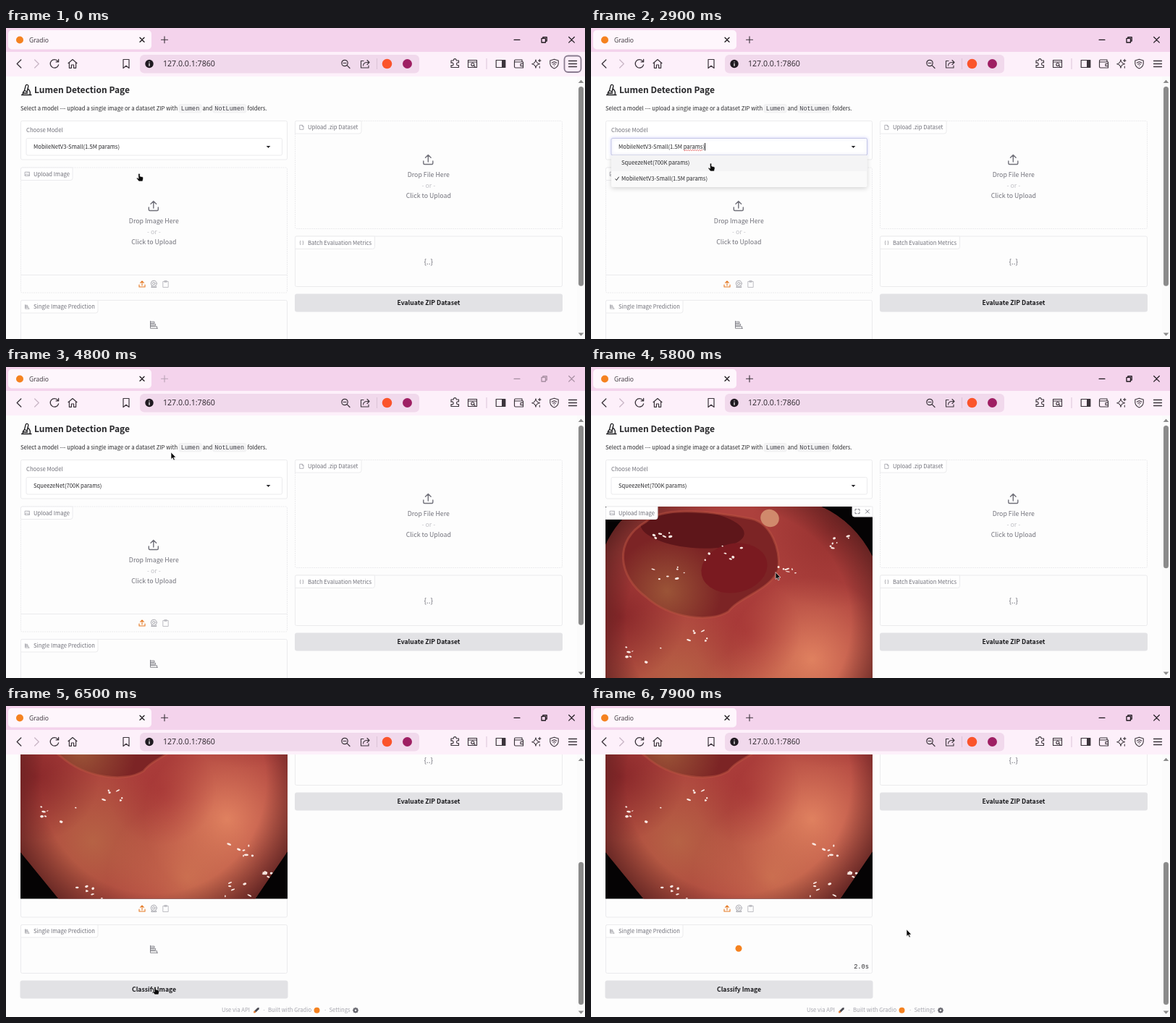
Animation of 800x430 px, one loop 8000 ms. Source, as an HTML page with a canvas:

```html
<!DOCTYPE html>
<html lang="en">
<head>
<meta charset="utf-8">
<title>Lumen Detection Page</title>
<style>
html, body { margin: 0; width: 100%; height: 100%; overflow: hidden; background: #fdfdfd; }
canvas { display: block; }
</style>
</head>
<body>
<canvas id="stage" width="800" height="430"></canvas>
<script>
const c = document.getElementById('stage').getContext('2d');
const SANS = '"Noto Sans CJK JP", "Noto Sans CJK SC", "Noto Sans", sans-serif';
const UI = '"Open Sans", "Noto Sans", sans-serif';
const MONO = '"Liberation Mono", "DejaVu Sans Mono", monospace';
const LOOP = 8000, STEP = 100;
const OPEN = 1500, PICK = 3100, DIALOG = 4300, LOADED = 5600, RUN = 6900;
const INK = '#27272a', GREY = '#71717a', LINE = '#ebebed', DARK = '#3b343b';
const ORANGE = '#f58220', TOP = 67;

// Pointer tip: time, x, y
const route = [
  [0, 184, 201], [300, 184, 201], [1100, 205, 163], [1700, 205, 163],
  [2500, 170, 190], [2900, 165.5, 187], [3100, 165.5, 187], [3900, 204, 268],
  [4300, 204, 268], [4800, 228, 118], [5200, 185, 170], [5500, 215, 215],
  [5800, 255, 284], [6000, 251, 280], [6500, 206, 388], [6900, 206, 388],
  [7100, 219.5, 320], [7900, 436, 309], [8000, 436, 309]
];

function pointerAt(t) {
  const i = route.findIndex(p => p[0] > t);
  const a = route[i - 1], b = route[i];
  let k = (t - a[0]) / (b[0] - a[0]);
  k = k * k * (3 - 2 * k);
  return [a[1] + (b[1] - a[1]) * k, a[2] + (b[2] - a[2]) * k];
}

// y is the middle of the capitals; returns the width
function text(s, x, y, size, color = INK, { align = 'left', weight = 400, family = SANS } = {}) {
  c.font = `${weight} ${size}px ${family}`;
  c.textAlign = align;
  c.fillStyle = color;
  c.fillText(s, x, y + size * 0.36);
  return c.measureText(s).width;
}

function box(x, y, w, h, r, fill, stroke, lw = 1, dash = []) {
  c.beginPath();
  c.roundRect(x, y, w, h, r);
  if (fill) { c.fillStyle = fill; c.fill(); }
  if (stroke) {
    c.strokeStyle = stroke;
    c.lineWidth = lw;
    c.setLineDash(dash);
    c.stroke();
    c.setLineDash([]);
  }
}

function icon(d, x, y, color, lw = 1.1, fill) {
  const p = new Path2D(d);
  c.save();
  c.translate(x, y);
  c.lineJoin = c.lineCap = 'round';
  if (fill) { c.fillStyle = fill; c.fill(p); }
  if (lw) { c.strokeStyle = color; c.lineWidth = lw; c.stroke(p); }
  c.restore();
}

function oval(x, y, rx, ry, fill, turn = 0) {
  c.beginPath();
  c.ellipse(x, y, rx, ry, turn, 0, 7);
  c.fillStyle = fill;
  c.fill();
}

const dot = (x, y, r, fill) => oval(x, y, r, r, fill);

const ICONS = {
  upload: 'M-6.5 2V5Q-6.5 6.5 -5 6.5H5Q6.5 6.5 6.5 5V2M0 3V-6.5M-3.8 -2.8L0 -6.5L3.8 -2.8',
  smallUpload: 'M-4 1V4H4V1M0 2V-4M-2.4 -1.7L0 -4L2.4 -1.7',
  webcam: 'M4 -.8A4 4 0 1 1 -4 -.8A4 4 0 1 1 4 -.8M1.7 -.8A1.7 1.7 0 1 1 -1.7 -.8A1.7 1.7 0 1 1 1.7 -.8M-2.5 2.5L-3.5 4.5H3.5L2.5 2.5',
  clipboard: 'M-3.5 -3.5H3.5V4.5H-3.5ZM-1.5 -4.5H1.5V-2.7H-1.5Z',
  image: 'M-3 -2.6H3V2.6H-3ZM-3 1.5L-1 0L.5 1.5L1.5 .7L3 2M1.2 -1.2h.2',
  file: 'M-2.3 -3H.8L2.5 -1.2V3H-2.3ZM.8 -3V-1.2H2.5',
  bars: 'M-4.5 -5V5H5.5M-4.5 -4.2H1V-2.2H-4.5M-4.5 -1H2.6V1H-4.5M-4.5 2.4H4.6V5',
  cross: 'M-3 -3L3 3M3 -3L-3 3',
  plus: 'M-4.5 0H4.5M0 -4.5V4.5',
  puzzle: 'M-5.5 -3.5H-2.2A2 2 0 1 1 1.7 -3.5H5V-.5A2 2 0 1 0 5 3V6H-5.5V3A2 2 0 1 0 -5.5 -.2Z',
  gear: 'M3 0A3 3 0 1 1 -3 0A3 3 0 1 1 3 0M0 -3.6V3.6M-3.6 0H3.6M-2.5 -2.5L2.5 2.5M2.5 -2.5L-2.5 2.5'
};

function chrome(active, focused) {
  const ctl = active ? '#1d181d' : '#a58da0';
  c.fillStyle = '#f4d3ec';
  c.fillRect(0, 0, 800, 34);
  c.fillStyle = '#fdf0fa';
  c.fillRect(0, 33, 800, 34);
  box(3, 3, 198, 26.5, 5, '#fef6fc');
  dot(19, 16.5, 5, ORANGE);
  text('Gradio', 32, 16.5, 8.6, '#3b343b', { family: UI });
  icon(ICONS.cross, 188, 16.3, '#1d181d', 1.3);
  icon(ICONS.plus, 219, 16.3, active ? DARK : '#b9a2b5', 1.1);
  icon('M-4 0H4', 706, 16.3, ctl, 1.2);
  icon('M-3.5 -2H2V3.7H-3.5ZM-1.6 -2V-3.7H3.7V1.8H2', 743.5, 16.3, ctl, 1.3);
  icon('M-3.8 -3.8L3.8 3.8M3.8 -3.8L-3.8 3.8', 781.5, 16.3, ctl, 1.2);

  icon('M2.8 -5.5L-2.8 0L2.8 5.5', 18, 49.5, DARK, 1.3);
  icon('M-2.8 -5.5L2.8 0L-2.8 5.5', 42.5, 49.5, '#c9b6c6', 1.3);
  icon('M5.6 1.4A5.8 5.8 0 1 1 4.6 -3.7M5.6 -6V-2.6H2.2', 67, 49.5, DARK, 1.3);
  icon('M-6 -.8L0 -6L6 -.8M-4.6 -1.8V5.8H-1.6V1.5H1.6V5.8H4.6V-1.8', 92, 49.5, DARK, 1.2);
  icon('M-4 -6H4V6L0 2.7L-4 6Z', 166, 49.5, DARK, 1.2);
  box(185, 37, 386, 25.5, 6, '#f1d9ec');
  dot(198, 49.5, 5.7, '#1f1a20');
  icon('M0 -.3V2.8M0 -2.7v.1', 198, 49.5, '#fff', 1.2);
  text('127.0.0.1:7860', 217, 49.3, 10.6, '#2a232a', { family: UI });
  icon('M3.2 -1A4.2 4.2 0 1 1 -5.2 -1A4.2 4.2 0 1 1 3.2 -1M2.2 2.2L6 6M-3 -1H1', 469, 49.5, DARK, 1.2);
  icon('M-2 -4H-5.5V5.5H5V2.5M-2.5 2.5Q-2 -2 3 -2H6M3 -5L6 -2L3 1', 496, 49.5, DARK, 1.1);
  c.fillStyle = '#dcc3d7';
  c.fillRect(512, 42, 1, 15);
  c.fillRect(663.5, 42, 1, 15);
  dot(526.5, 49.5, 6.8, '#fb542b');
  dot(554.5, 49.5, 6.5, '#9e1f63');

  icon(ICONS.puzzle, 620.5, 48.5, DARK, 1.15);
  icon('M-6 -5H6V5H-6ZM-6 -2.5H6M2.3 1A2 2 0 1 1 -1.7 1A2 2 0 1 1 2.3 1M2 2.5L3.7 4', 644.5, 49.5, DARK, 1.1);
  icon('M-6.3 -5H6.3V5H-6.3Z', 683.5, 49.5, DARK, 1.2);
  c.fillStyle = DARK;
  c.fillRect(685, 44.5, 5, 10);
  icon('M-6 -3V4Q-6 5.5 -4.5 5.5H6V-2.5H-5Q-6 -2.5 -6 -4Q-6 -5.5 -4.5 -5.5H4.5V-2.5M6 0H2.5V3H6', 708.5, 49.5, DARK, 1.15);
  icon('M-1 -5.5Q-.5 -.5 4.5 .5Q-.5 1.2 -1 6Q-1.8 1.2 -6.3 .5Q-1.8 -.5 -1 -5.5ZM4.3 -6V-2.5M2.5 -4.2H6M4.3 3.6V6', 733, 49.3, DARK, 1.05);
  icon('M0 -6.3L5.7 -4.5V0Q5 4.5 0 6.5Q-5 4.5 -5.7 0V-4.5ZM-3.2 -1.3Q0 -4 3.2 -1.3M-1.8 .7Q0 -.8 1.8 .7M0 2.6v.1', 757.5, 49.5, DARK, 1.1);
  if (focused) box(771.5, 38.5, 23, 22.5, 5, '#fbeef8', '#8a7c90', 1.8);
  icon('M-5.5 -4H5.5M-5.5 0H5.5M-5.5 4H5.5', 783, 49.5, DARK, 1.3);
}

function tag(x, y, w, label, glyph) {
  box(x, y, w, 17.5, [2, 0, 3, 0], '#fff', LINE);
  if (glyph === 'braces') text('{ }', x + 9, y + 8.7, 6.5, GREY, { align: 'center' });
  else if (glyph === 'bars') {
    c.save();
    c.translate(x + 8.5, y + 9);
    c.scale(0.55, 0.55);
    icon(ICONS.bars, 0, 0, '#8d8d95', 1);
    c.restore();
  } else icon(ICONS[glyph], x + 9, y + 8.8, '#a0a0a8', 0.8);
  text(label, x + 17.5, y + 8.8, 7.7, GREY);
}

function dropZone(x, y, what) {
  icon(ICONS.upload, x - 0.5, y, GREY, 1.4);
  const mid = { align: 'center' };
  text(`Drop ${what} Here`, x, y + 21, 8.8, GREY, mid);
  text('- or -', x, y + 35.7, 8.8, '#c2c2c7', mid);
  text('Click to Upload', x, y + 50.3, 8.8, GREY, mid);
}

function button(x, y, w, label) {
  box(x, y, w, 25, 3, '#e2e2e5');
  text(label, x + w / 2, y + 12.5, 8.65, '#18181b', { align: 'center', weight: 600 });
}

function glow(x, y, r, rgb, alpha, inner = 0) {
  const g = c.createRadialGradient(x, y, inner, x, y, r);
  g.addColorStop(0, `rgba(${rgb},${inner ? 0 : alpha})`);
  g.addColorStop(1, `rgba(${rgb},${inner ? alpha : 0})`);
  c.fillStyle = g;
  c.fillRect(20, 193, 369, 321.5);
}

// Soft tones with a dark hollow and a few wet glints
function photo() {
  c.save();
  c.beginPath();
  c.rect(20, 193, 369, 321.5);
  c.clip();
  c.fillStyle = '#050304';
  c.fillRect(20, 193, 369, 322);
  c.clip(new Path2D('M64 193H318Q364 214 389 262V449L344 515H73L20 450V246Q36 212 64 193Z'));
  c.fillStyle = '#ad413d';
  c.fillRect(20, 193, 369, 322);
  glow(305, 405, 115, '230,136,100', 0.9);
  glow(120, 435, 115, '184,104,70', 0.85);
  glow(250, 485, 110, '212,126,86', 0.7);
  glow(215, 365, 75, '160,46,48', 0.5);
  glow(330, 225, 110, '138,40,40', 0.6);
  glow(40, 345, 90, '122,30,34', 0.7);
  glow(204, 352, 245, '20,4,6', 0.75, 155);
  const hollow = new Path2D('M76 214C100 190 180 202 222 210C248 216 262 250 259 280C248 308 205 318 190 338C165 354 110 348 76 318C38 290 30 240 76 214Z');
  c.fillStyle = '#7c2425';
  c.fill(hollow);
  c.save();
  c.clip(hollow);
  glow(105, 310, 75, '160,92,58', 0.85);
  oval(140, 224, 72, 26, '#5e161a', 0.1);
  oval(198, 278, 46, 34, '#7a1a20', -0.2);
  c.restore();
  c.strokeStyle = 'rgba(190,84,66,.5)';
  c.lineWidth = 3;
  c.stroke(hollow);
  oval(247, 209, 13, 12, '#d08a6c', 0.5);
  let seed = 9;
  const rnd = () => (seed = seed * 16807 % 2147483647) / 2147483647;
  const glints = [[108, 286, 22], [97, 232, 14], [185, 259, 34], [269, 280, 14], [348, 241, 22],
    [70, 399, 30], [145, 372, 16], [326, 447, 18], [316, 504, 28], [120, 508, 24], [360, 481, 8]];
  for (const [x, y, w] of glints)
    for (let i = 0; i < 7; i++)
      oval(x + (rnd() - 0.5) * w * 2, y + (rnd() - 0.5) * w * 0.9, 0.8 + rnd() * 2.4, 0.6 + rnd() * 1.2, '#fbeae4', rnd() - 0.5);
  c.restore();
}

function header() {
  icon('M-6.5 7H7M-5 7L-4.5 3.5L-2.5 1L-.8 -5.8Q-.2 -7.5 1.5 -7Q3.2 -6.5 2.8 -4.8L1 3M2.3 -1.5Q6.5 2 5 7M-2.5 1L1 2.5M-4.5 4.5H1.5', 28, 85.5, '#18181b', 1.3);
  text('Lumen Detection Page', 39, 85.5, 12, INK, { weight: 600 });
  text('Select a model --- upload a single image or a dataset ZIP with', 20, 111, 7.7);
  box(239, 105.5, 31, 11.5, 2, '#f4f4f5', '#ebebed', 0.6);
  text('Lumen', 241.8, 111, 8.5, '#3f3f46', { family: MONO });
  text('and', 271.5, 111, 7.7);
  box(285.8, 105.5, 46, 11.5, 2, '#f4f4f5', '#ebebed', 0.6);
  text('NotLumen', 288.3, 111, 8.5, '#3f3f46', { family: MONO });
  text('folders.', 333.5, 111, 7.7);
}

const MODELS = ['SqueezeNet(700K params)', 'MobileNetV3-Small(1.5M params)'];

function squiggle(from, to, y) {
  c.beginPath();
  for (let x = from; x <= to; x += 0.5) c.lineTo(x, y + Math.sin(x * 2) * 0.7);
  c.strokeStyle = '#e04444';
  c.lineWidth = 0.8;
  c.stroke();
}

function chooser(t, open) {
  box(20.5, 128.5, 368, 53.5, 2, '#fff', LINE);
  text('Choose Model', 28, 141, 7.7, GREY);
  if (open) {
    c.save();
    c.shadowColor = 'rgba(99,102,241,.25)';
    c.shadowBlur = 4;
    box(28, 152.5, 353.5, 23.5, 2, '#fff', '#c5c7e6');
    c.restore();
  } else box(28, 152.5, 353.5, 23.5, 2, '#fff', LINE);
  const end = 38 + text(MODELS[t < PICK ? 1 : 0], 38, 164, 7.7);
  icon('M-2.8 -1.3H2.8L0 1.6Z', 362.5, 164.3, INK, 0, INK);
  if (!open) return;
  squiggle(end - 29, end - 3, 169);
  if ((t - OPEN) % 600 < 300) {
    c.fillStyle = INK;
    c.fillRect(Math.round(end), 159, 1, 10.5);
  }
}

function options(t) {
  c.save();
  c.shadowColor = 'rgba(0,0,0,.16)';
  c.shadowBlur = 6;
  c.shadowOffsetY = 2;
  box(28, 176, 353.5, 44, [0, 0, 2, 2], '#fafafa');
  c.restore();
  const first = pointerAt(t)[1] < 198;
  c.fillStyle = '#f4f4f5';
  c.fillRect(28, first ? 176 : 198, 353.5, 22);
  MODELS.forEach((m, i) => text(m, 42, 186.5 + i * 22, 7.7));
  icon('M-2.2 .3L-.7 2L2.3 -2.4', 36, 208.5, INK, 1);
}

function page(t) {
  const loaded = t >= LOADED, open = t >= OPEN && t < PICK;
  const d = loaded ? 174 : 0;
  header();
  chooser(t, open);

  box(20.5, 193, 368, 173 + d, 2, '#fdfdfd', LINE, 1, loaded ? [] : [2, 1]);
  if (loaded) {
    photo();
    box(361, 193, 28, 14, [0, 0, 0, 3], '#fff', LINE);
    icon('M-3 -1V-3H-1M1 -3H3V-1M3 1V3H1M-1 3H-3V1', 368, 199.7, GREY, 0.9);
    icon('M-2.5 -2.5L2.5 2.5M2.5 -2.5L-2.5 2.5', 382, 199.7, GREY, 0.9);
  } else {
    dropZone(204.3, 246, 'Image');
    c.fillStyle = LINE;
    c.fillRect(20.5, 341, 368, 1);
  }
  tag(20.5, 193, 71.5, 'Upload Image', 'image');
  icon(ICONS.smallUpload, 188, 354 + d, '#e57a25', 1.1);
  icon(ICONS.webcam, 204.3, 354 + d, '#9b9ba3', 0.9);
  icon(ICONS.clipboard, 220.7, 354 + d, '#b9b9bf', 0.9);

  box(20.5, 376.5 + d, 368, 67, 2, '#fdfdfd', LINE);
  tag(20.5, 376.5 + d, 106.5, 'Single Image Prediction', 'bars');
  if (t > RUN) {
    dot(204, 409.3 + d, 4.5, ORANGE);
    text(((t - RUN) / 500).toFixed(1) + 's', 384, 433.5 + d, 8.7, INK, { align: 'right', family: MONO });
  } else icon(ICONS.bars, 204, 410.3 + d, GREY, 0.8);
  button(19.5, 453.5 + d, 370, 'Classify Image');

  box(399.5, 128.5, 369, 149, 2, '#fdfdfd', LINE, 1, [2, 1]);
  tag(399.5, 128.5, 91.5, 'Upload .zip Dataset', 'file');
  dropZone(583.8, 182, 'File');
  box(399.5, 288, 369, 69.5, 2, '#fdfdfd', LINE);
  tag(399.5, 288, 110, 'Batch Evaluation Metrics', 'braces');
  text('{..}', 583.7, 323.5, 10.2, GREY, { align: 'center' });
  button(399, 367.5, 370, 'Evaluate ZIP Dataset');

  const fy = 494.7 + d, pale = '#a5a5ad';
  text('Use via API', 298, fy, 7.7, pale);
  icon('M-3.5 3.5L-2.5 .5L1.5 -3.5L3.8 -3.8L3.5 -1.5L-.5 2.5Z', 346, fy, '#333', 0, '#4a4a52');
  dot(343.5, fy + 2.4, 1.5, '#e8833a');
  text('·', 354.5, fy, 7.7, pale);
  text('Built with Gradio', 362, fy, 7.7, pale);
  dot(429.5, fy, 4, ORANGE);
  text('·', 439, fy, 7.7, pale);
  text('Settings', 446.5, fy, 7.7, pale);
  icon(ICONS.gear, 483, fy, '#66666d', 1.1, '#77777f');
  dot(483, fy, 1.2, '#fdfdfd');
  if (open) options(t);
}

function scrollbar(scroll, total) {
  c.fillStyle = '#fbfbfb';
  c.fillRect(789, TOP, 11, 363);
  const track = 332;
  box(791, 81 + scroll / total * track, 7, 363 / total * track, 3.5, '#8b8b8b');
  icon('M-3.8 2L0 -2.2L3.8 2Z', 794.5, 74, '', 0, '#8b8b8b');
  icon('M-3.8 -2L0 2.2L3.8 -2Z', 794.5, 423.5, '', 0, '#8b8b8b');
}

function pointer(t) {
  const [x, y] = pointerAt(t);
  const hand = t < DIALOG || (t < 7000 && y > 380);
  if (hand) icon('M-1.2 .8Q0 -.8 1.2 .8V4L4.5 4.8Q6 5.2 5.7 7L4.8 11H-.5L-3.5 7.2Q-4 5.8 -2.6 6L-1.2 7Z', x, y, '#fff', 0.7, '#0b0b0b');
  else icon('M0 0V9.5L2.2 7.6L3.7 11L5.3 10.3L3.8 7H6.6Z', x, y, '#fff', 0.6, '#0b0b0b');
}

function draw(t) {
  const scroll = t < 5900 ? 0 : t < 6000 ? 150 : t < 6100 ? 247 : 248;
  c.fillStyle = '#fdfdfd';
  c.fillRect(0, 0, 800, 430);
  c.save();
  c.beginPath();
  c.rect(0, TOP, 800, 363);
  c.clip();
  c.translate(0, -scroll);
  page(t);
  c.restore();
  scrollbar(scroll, t < LOADED ? 437 : 611);
  chrome(t < DIALOG || t >= LOADED, t < OPEN);
  pointer(t);
}

const start = performance.now();
function frame() {
  const t = (performance.now() - start) % LOOP;
  draw(Math.floor(t / STEP) * STEP);
  requestAnimationFrame(frame);
}
frame();
</script>
</body>
</html>
```
